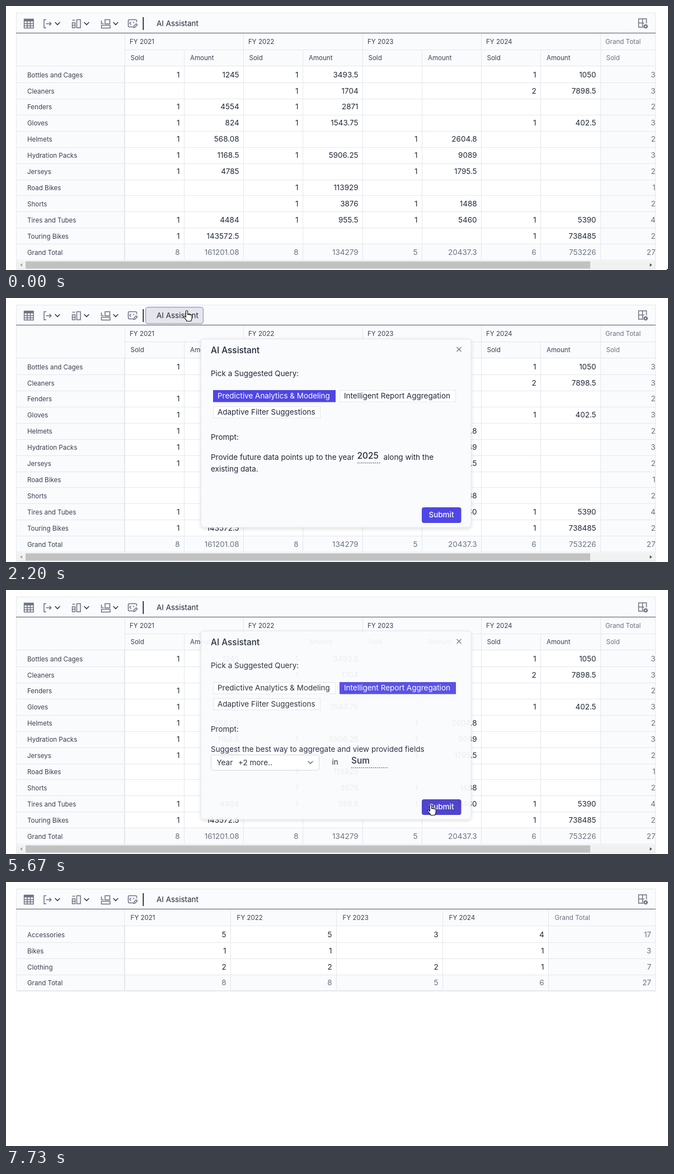
An HTML page that plays this animation: 1183 by 473 pixels, repeating every 9.34 s.

```html
<!DOCTYPE html>
<html lang="en">
<head>
<meta charset="utf-8">
<title>Pivot table assistant</title>
<style>
html, body { margin: 0; width: 100%; height: 100%; overflow: hidden; background: #fff; }
svg { display: block; width: 1183px; height: 473px; }
text { font-family: Inter, "Liberation Sans", sans-serif; white-space: pre; }
</style>
</head>
<body>
<script>
const LINE = '#e5e7eb', PALE = '#fafbfd', INK = '#1f2937', HEAD = '#374151', GREY = '#6b7280', BLUE = '#4f46e5';
const SMALL = 11.56, BODY = 13.48, LARGE = 15.4;

const rect = (x, y, w, h, fill, more = '') => `<rect x="${x}" y="${y}" width="${w}" height="${h}" fill="${fill}" ${more}/>`;
const hline = (x, y, w, c = LINE) => rect(x, y, w, 1, c);
const vline = (x, y, h, c = LINE) => rect(x, y, 1, h, c);
const path = (d, more = '') => `<path d="${d}" ${more}/>`;
const group = (id, body, more = '') => `<g id="${id}" ${more}>${body}</g>`;
const text = (x, y, s, size = BODY, fill = INK, more = '') =>
  `<text x="${x}" y="${y}" font-size="${size}" fill="${fill}" ${more}>${s.replace('&', '&amp;')}</text>`;
const right = (x, y, s, fill) => text(x, y, s, BODY, fill, 'text-anchor="end"');
const chevron = (x, y, c = '#374151') =>
  path(`M${x - 4} ${y - 2}l4 4 4-4`, `fill="none" stroke="${c}" stroke-width="1.6" stroke-linecap="round"`);

// Toolbar
function toolbar() {
  const icons = [
    'M32.5 23.5h16.5v16h-16.5zM32.5 31.5h16.5M32.5 35.5h16.5M38 27v12.5M43.5 27v12.5',
    'M72 24.5h-4v14.5h4M71.5 31.7h9M77.5 28.5l3.2 3.2-3.2 3.2',
    'M126.5 24.5h6.5v14.5h-6.5zM118.5 30h5v9h-5zM118.5 34.5h5M118.5 25.5h5',
    'M170.5 34.5h15.5v5h-15.5zM177 24.5h8.5v7.5h-8.5zM170.5 26v5.5h4',
    'M227 37.5h-6.5q-2 0-2-2v-9q0-2 2-2h11q2 0 2 2v2.5M223.5 28.5l-2.5 2.5 2.5 2.5M227 28.5l2 2',
    'M228.5 36l4.2-4.2 2 2-4.2 4.2-2.5.6z',
    'M1138.5 38h-8v-15h14v8M1130.5 30.5h10M1137.5 23v15'
  ];
  return rect(18, 12, 1143, 36, PALE) + hline(18, 12, 1143) + vline(18, 12, 36) + vline(1160, 12, 36) +
    path(icons.join(''), `fill="none" stroke="${GREY}" stroke-width="1.5"`) +
    rect(32.5, 23.5, 16.5, 4, GREY) +
    `<circle cx="1143" cy="36.5" r="2.3" fill="none" stroke="${GREY}" stroke-width="2"/>` +
    `<circle cx="1143" cy="36.5" r="3.6" fill="none" stroke="${GREY}" stroke-width="1.3" stroke-dasharray="1.5 1.5"/>` +
    [92, 144, 196].map(x => chevron(x, 31.5)).join('') +
    rect(244.5, 20, 1.6, 23, '#111') +
    rect(249.5, 16.5, 103, 29.5, '#e5e6eb', 'rx="4.5" id="aiHover"') +
    rect(249.5, 16.5, 103, 29.5, 'none', `rx="4.5" id="ring" stroke="${BLUE}" stroke-width="1.4"`) +
    text(269, 36, 'AI Assistant') + hline(18, 48, 1143, '#4b5563');
}

// Detailed table
const detail = `Bottles and Cages|1 1245 1 3493.5 - - 1 1050 3
Cleaners|- - 1 1704 - - 2 7898.5 3
Fenders|1 4554 1 2871 - - - - 2
Gloves|1 824 1 1543.75 - - 1 402.5 3
Helmets|1 568.08 - - 1 2604.8 - - 2
Hydration Packs|1 1168.5 1 5906.25 1 9089 - - 3
Jerseys|1 4785 - - 1 1795.5 - - 2
Road Bikes|- - 1 113929 - - - - 1
Shorts|- - 1 3876 1 1488 - - 2
Tires and Tubes|1 4484 1 955.5 1 5460 1 5390 4
Touring Bikes|1 143572.5 - - - - 1 738485 2
Grand Total|8 161201.08 8 134279 5 20437.3 6 753226 27`;
const summary = `Accessories|5 5 3 4 17
Bikes|1 1 - 1 3
Clothing|2 2 2 1 7
Grand Total|8 8 5 6 27`;

function rows(data, top, step, cols, lastRight) {
  const list = data.split('\n'), n = cols.length - 1;
  return list.map((row, i) => {
    const [name, cells] = row.split('|');
    const y = Math.round(top + i * step), mid = top + i * step + 15, total = i === list.length - 1;
    return hline(19, Math.round(top + (i + 1) * step), 1142) +
      text(38, mid + 4.6, name, SMALL, HEAD) +
      cells.split(' ').map((v, k) => v === '-' ? '' :
        right(k === n - 1 ? lastRight : cols[k + 1] - 7.4, mid + 4.6, v, total || k === n - 1 ? GREY : INK)).join('');
  }).join('');
}

function bigTable() {
  const cols = Array.from({ length: 9 }, (_, i) => Math.round(211.5 + i * 106.27)).concat(1161);
  let s = rect(18, 49, 1143, 407, PALE) + rect(212, 108, 850, 319, '#fff') +
    hline(212, 78, 949) + hline(19, 107, 1142);
  cols.slice(0, 9).forEach((x, i) => {
    s += i % 2 ? vline(x, 79, 377) : vline(x, 49, 407);
    s += text(x + (i % 2 ? 11 : 10.5), 97.4, i % 2 ? 'Amount' : 'Sold', SMALL, i === 8 ? GREY : HEAD);
    if (i % 2 === 0)
      s += text(x + 9, 68.3, i === 8 ? 'Grand Total' : 'FY ' + (2021 + i / 2), SMALL, i === 8 ? GREY : HEAD);
  });
  return s + vline(211, 108, 348) + rows(detail, 108, 28.93, cols, 1160.6) +
    rect(19, 457, 1142, 14, '#f1f1f1') + rect(35, 457.5, 1009, 13, '#c1c1c1', 'id="thumb"') +
    path('M29 461v6l-4-3z', 'fill="#a3a3a3"') + path('M1150.5 461v6l4-3z', 'fill="#505050"') +
    vline(18, 49, 423) + vline(1160, 49, 423) + hline(18, 471, 1143);
}

function smallTable() {
  const cols = [211, 401, 590, 780, 969, 1161];
  let s = rect(18, 49, 1143, 146, PALE) + rect(212, 79, 758, 88, '#fff') + hline(19, 78, 1142);
  cols.slice(0, 5).forEach((x, i) => {
    s += vline(x, 49, 146) +
      text(x + 11.6, 68.3, i === 4 ? 'Grand Total' : 'FY ' + (2021 + i), SMALL, i === 4 ? GREY : HEAD);
  });
  return s + vline(211, 79, 116) + vline(212, 79, 116) + rows(summary, 79, 28.95, cols, 1153) +
    vline(18, 49, 146) + vline(1160, 49, 146) + hline(18, 194, 1143);
}

// Dialog
function chip(id, x, y, w, label) {
  const box = (fill, stroke) => rect(x + .5, y + .5, w - 1, 20.5, fill, `stroke="${stroke}"`);
  return group(id, box('#fff', LINE)) + text(x + 8, y + 15.3, label) +
    group(id + 'On', box(BLUE, BLUE) + text(x + 8, y + 15.3, label, BODY, '#fff'));
}
const dashes = (x, y, w) => path(`M${x} ${y}h${w}`, `stroke="${HEAD}" stroke-dasharray="2 1.5"`);
const bold = 'font-weight="500"';

function dialog() {
  const predict = text(366, 290, 'Provide future data points up to the year') +
    text(627.5, 288, '2025', LARGE, INK, bold) + dashes(628, 295.5, 41) +
    text(674.5, 290, 'along with the') + text(366, 311, 'existing data.');
  const report = text(366, 290, 'Suggest the best way to aggregate and view provided fields') +
    rect(366.5, 295.5, 193, 27.5, '#fff', 'rx="4" stroke="#d1d5db"') +
    text(376.5, 314, 'Year') + text(415, 314, '+2 more..') + chevron(544, 309, GREY) +
    text(582.5, 313, 'in') + text(617, 311, 'Sum', LARGE, INK, bold) + dashes(617, 318.5, 66);
  return rect(348.5, 73.5, 482.5, 337.5, PALE, `rx="6" stroke="${LINE}" filter="url(#shadow)"`) +
    text(366, 99, 'AI Assistant', LARGE, INK, bold) +
    path('M805.5 88l8 8m0-8l-8 8', `stroke="${GREY}" stroke-width="1.2"`) +
    text(366, 139.7, 'Pick a Suggested Query:') +
    chip('c1', 370, 165, 219, 'Predictive Analytics & Modeling') +
    chip('c2', 596, 165, 208, 'Intelligent Report Aggregation') +
    chip('c3', 370, 194, 192, 'Adaptive Filter Suggestions') +
    text(366, 253.5, 'Prompt:') + group('predict', predict) + group('report', report) +
    rect(743, 375, 70.5, 28, BLUE, 'rx="4" id="submit"') +
    text(778, 393.3, 'Submit', BODY, '#fff', bold + ' text-anchor="middle"');
}

const outline = 'fill="#fff" stroke="#111" stroke-width="1.1" stroke-linejoin="round"';
const hand = 'M5 12.5V2.1a1.6 1.6 0 0 1 3.2 0V8a1.4 1.4 0 0 1 2.7.3a1.4 1.4 0 0 1 2.6.4a1.3 1.3 0 0 1 2.3.9V14' +
  'c0 2-1.2 3-1.6 5.5H6.7C6 17 2.5 14 1.2 12.2c-1-1.6.8-2.6 2-1.4z';

document.body.innerHTML = `<svg viewBox="0 0 1183 473">
  <defs><filter id="shadow" x="-5%" y="-5%" width="110%" height="112%">
    <feDropShadow dx="0" dy="2" stdDeviation="3" flood-opacity=".14"/></filter></defs>` +
  toolbar() + group('big', bigTable()) + group('small', smallTable()) +
  group('spinner', '<circle r="14.5" stroke="#e0e3fb"/>' + path('M-14.5 0A14.5 14.5 0 0 1 0-14.5', `stroke="${BLUE}"`),
    'fill="none" stroke-width="4"') +
  group('dialog', dialog()) +
  group('cursor', path('M.5.5V14.6L3.9 11.5 6.2 16.6 8.6 15.5 6.4 10.6H11z', `${outline} id="arrow"`) +
    path(hand, `${outline} id="hand" transform="translate(-6.6 0)"`)) + '</svg>';

const el = id => document.getElementById(id);
const show = (id, on) => el(id).setAttribute('opacity', +on);
const fill = (id, c) => el(id).setAttribute('fill', c);
const ramp = (t, a, b) => Math.min(1, Math.max(0, (t - a) / (b - a)));
const ease = p => p * p * (3 - 2 * p);

const LOOP = 9340, STEP = 200 / 3;
// start, end, x, y of each pointer move
const moves = [
  [133, 267, 443, 188], [467, 1067, 323, 22], [2400, 2667, 657.5, 166], [3000, 3133, 657.5, 170],
  [4267, 5000, 759, 384], [5740, 6400, 239, 421], [6400, 6600, 190, 482]
];
function pointer(t) {
  let x = 1181, y = 471;
  for (const [a, b, mx, my] of moves) {
    const p = ease(ramp(t, a, b));
    x += (mx - x) * p;
    y += (my - y) * p;
  }
  return [x, y];
}

function draw(now) {
  const t = Math.floor((now % LOOP + 4) / STEP) * STEP;
  const [x, y] = pointer(t);
  const over = (l, tp, w, h) => x >= l && x <= l + w && y >= tp && y <= tp + h;
  const fade = ramp(t, 1680, 2080) * (1 - ramp(t, 5640, 6040));
  const open = t > 1680 && t < 6000;
  const picked = ramp(t, 3800, 4000);
  const onAi = over(249, 16, 104, 30), onChip = open && over(596, 165, 208, 22), onSubmit = open && over(743, 375, 70, 28);
  const down = a => t >= a && t < a + 195;
  const done = t > 7530;

  el('cursor').setAttribute('transform', `translate(${x} ${y})`);
  const pointing = onAi || onChip || onSubmit;
  show('hand', pointing);
  show('arrow', !pointing);

  show('aiHover', onAi);
  fill('aiHover', down(1530) ? '#d1d5db' : '#e5e6eb');
  show('ring', t < 5000 ? (t > 1530) * (1 - ramp(t, 2130, 2270)) : ramp(t, 6000, 6130) * (1 - ramp(t, 7530, 7730)));

  show('dialog', fade);
  show('c1On', 1 - picked);
  show('c2On', picked);
  show('c3On', 0);
  el('c2').firstChild.setAttribute('fill', onChip ? (down(3530) ? '#b4b9c4' : '#d1d5db') : '#fff');
  show('predict', t < 3860);
  show('report', t >= 3860);
  fill('submit', onSubmit ? (down(5460) ? '#3730a3' : '#4338ca') : BLUE);

  show('big', !done);
  show('small', done);
  fill('thumb', over(35, 457, 1009, 14) ? '#a8a8a8' : '#c1c1c1');
  show('spinner', t > 6000 && !done);
  el('spinner').setAttribute('transform', `translate(590 242.5) rotate(${(t - 6867) / 1300 * 360})`);
}

const start = performance.now();
function tick() {
  draw(performance.now() - start);
  requestAnimationFrame(tick);
}
tick();
</script>
</body>
</html>
```
